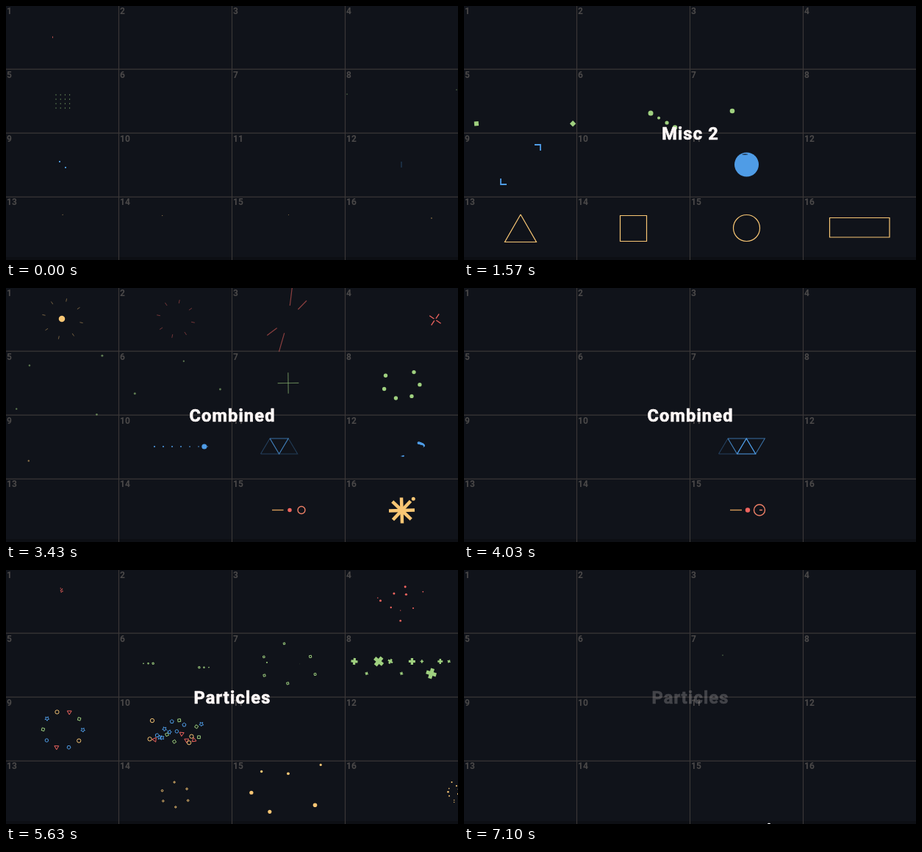
Animation of 615x346 px, one loop 7130 ms. Source, as an HTML page with a canvas:

```html
<!DOCTYPE html>
<html lang="en">
<head>
<meta charset="utf-8">
<title>Motion shapes</title>
<style>
html, body { margin: 0; width: 100%; height: 100%; overflow: hidden; background: #10131a; }
canvas, svg { position: absolute; left: 0; top: 0; width: 615px; height: 346px; }
text { font-family: Roboto, "Open Sans", sans-serif; font-weight: 700; }
.num { font-size: 12px; fill: #4b4949; }
#title { font-size: 23.5px; letter-spacing: 1.2px; fill: #fff8f7; stroke: #fff8f7; stroke-width: .7; stroke-linejoin: round; text-anchor: middle; }
</style>
</head>
<body>
<canvas id="stage" width="615" height="346"></canvas>
<svg viewBox="0 0 615 346"><g id="nums"></g><text id="title" x="308" y="182"></text></svg>
<script>
const LOOP = 7130, TAU = Math.PI * 2;
const BG = '#10131a', RED = '#f0645f', GREEN = '#9fd07f', BLUE = '#4f9ce6', GOLD = '#f8c674';
const g = document.getElementById('stage').getContext('2d');
const title = document.getElementById('title');
const nums = document.getElementById('nums');
for (let i = 0; i < 16; i++) {
  const n = document.createElementNS('http://www.w3.org/2000/svg', 'text');
  n.setAttribute('class', 'num');
  n.setAttribute('x', 1 + i % 4 * 154);
  n.setAttribute('y', 11 + Math.floor(i / 4) * 86.8);
  n.textContent = i + 1;
  nums.append(n);
}

// Timing
const part = (t, a, b) => Math.min(1, Math.max(0, (t - a) / (b - a)));
const ease = (t, a, b) => 1 - (1 - part(t, a, b)) ** 3;
const hump = (t, a, b) => Math.sin(Math.PI * part(t, a, b));
// Reaches 1 at time a, then drifts on by m until time b
const grow = (t, a, b, m) => t < a ? t / a : 1 + m * ease(t, a, b);
const rnd = n => { const v = Math.sin(n * 127.1 + 3.7) * 43758.5453; return v - Math.floor(v); };
const mix = (a, b, k) => a + (b - a) * k;

// Drawing
function fade(alpha, draw) {
  if (alpha <= 0) return;
  g.save();
  g.globalAlpha *= Math.min(1, alpha);
  draw();
  g.restore();
}
function clip(x, y, draw) {
  g.save();
  g.beginPath();
  g.rect(x, y, 153, 86);
  g.clip();
  draw();
  g.restore();
}
function dot(x, y, r, color) {
  if (r <= 0) return;
  g.fillStyle = color;
  g.beginPath();
  g.arc(x, y, r, 0, TAU);
  g.fill();
}
function ring(x, y, r, color, w = 1) {
  if (r <= 0 || w <= 0) return;
  g.strokeStyle = color;
  g.lineWidth = w;
  g.beginPath();
  g.arc(x, y, r, 0, TAU);
  g.stroke();
}
function line(color, w, ...p) {
  if (w <= 0) return;
  g.strokeStyle = color;
  g.lineWidth = w;
  g.beginPath();
  for (let i = 0; i < p.length; i += 2) g.lineTo(p[i], p[i + 1]);
  g.stroke();
}
function poly(x, y, r, n, color, rot = 0, star = false, filled = false) {
  if (r <= 0) return;
  const m = star ? n * 2 : n;
  g.beginPath();
  for (let i = 0; i < m; i++) {
    const a = rot - TAU / 4 + i * TAU / m, d = star && i % 2 ? r * .5 : r;
    g.lineTo(x + d * Math.cos(a), y + d * Math.sin(a));
  }
  g.closePath();
  g.lineWidth = 1;
  g.fillStyle = g.strokeStyle = color;
  filled ? g.fill() : g.stroke();
}
const square = (x, y, r, color) => poly(x, y, r * 1.25, 4, color, .6);
function ray(x, y, a, r, len, color, w) {
  const c = Math.cos(a), s = Math.sin(a);
  line(color, w, x + c * r, y + s * r, x + c * (r + len), y + s * (r + len));
}
function rays(x, y, n, r, len, color, w = 1, rot = 0) {
  for (let i = 0; i < n; i++) ray(x, y, rot + i * TAU / n, r, len, color, w);
}
function plus(x, y, size, color, rot) {
  for (const a of [rot, rot + TAU / 4]) {
    const c = Math.cos(a) * size / 2, s = Math.sin(a) * size / 2;
    line(color, size * .36, x - c, y - s, x + c, y + s);
  }
}
// Particles on a ring; jitter loosens angle, distance and size
function spray(n, cx, cy, rx, ry, size, color, draw = dot, phase = 0, jitter = .6) {
  const loose = k => (rnd(k + cx) - .5) * jitter;
  for (let i = 0; i < n; i++) {
    const a = phase + i * TAU / n + loose(i), d = 1 + loose(i + 30);
    draw(cx + rx * d * Math.cos(a), cy + ry * d * Math.sin(a), size * (1 + loose(i + 60)), color);
  }
}
function trace(path, length, a, b) {
  if (b <= a) return;
  g.strokeStyle = GOLD;
  g.lineWidth = 1.2;
  g.setLineDash([length * (b - a), length * 2]);
  g.lineDashOffset = -length * a;
  g.stroke(path);
  g.setLineDash([]);
}

const outlines = [
  ['M77 284L98.5 321.5H55.5Z', 130],
  ['M212.5 285.5H248.5V320.5H212.5Z', 142],
  ['M384.5 284.5a18 18 0 1 1 0 36a18 18 0 1 1 0-36', 114],
  ['M579 288.5V315H497.5V288.5Z', 216]
].map(([d, len]) => [new Path2D(d), len]);

function misc(t) {
  line(RED, 2 * (1 - part(t, 700, 1000)), 63 + 28 * ease(t, 250, 950), 42.5, 63.7 + 28 * ease(t, 0, 550), 42.5);
  ring(231, 43, 26 * ease(t, 60, 900), RED, 5 * (1 - ease(t, 100, 950)));
  rays(384, 43, 8, 24 * ease(t, 100, 900), 12 * hump(t, 30, 1000), RED, 1.5);
  fade(hump(t, 30, 1400), () => {
    poly(538, 43, 22 * ease(t, 30, 1000), 4, RED, t / 500);
    poly(538, 43, 12 * ease(t, 200, 1200), 4, RED, -t / 500);
  });

  const s = 1 + 2 * hump(t, 0, 800);
  fade(1 - part(t, 400, 850), () => {
    g.fillStyle = GREEN;
    for (let i = 0; i < 16; i++) g.fillRect(68 + i % 4 * 6.2 - s / 2, 121 + (i >> 2) * 6 - s / 2, s, s);
  });
  const slide = 74 * ease(t, 900, 2200), turn = (t - 1570) / 300;
  for (const side of [-1, 1])
    poly(82.5 + side * slide, 130 + slide * .46, 4.2 * hump(t, 900, 2200), 4, GREEN, turn + (side < 0 ? .7 : 0), false, true);
  const pop = hump(t, 1000, 2140), k = ease(t, 1000, 2140) / .875;
  for (let i = 0; i < 4; i++)
    dot(231 + (23 + 11 * i) * k, 134 + (12 + 6.5 * i) * k, (i ? 1.4 + .6 * i : 3.5) * pop, GREEN);
  dot(384 - 19 * k, 130 + 13 * k, 3.3 * pop, GREEN);
  ring(231, 130, 22 * ease(t, 40, 800), GREEN, 4 * (1 - ease(t, 100, 900)));
  poly(384, 130, 20 * hump(t, 40, 1000), 4, GREEN, t / 400);
  const meet = part(t, 0, 700) ** 2, fat = .6 + 2.6 * part(t, 0, 600);
  if (t < 700) {
    dot(mix(464, 538, meet), mix(120, 130, meet), fat, GREEN);
    dot(mix(613, 538, meet), mix(114, 130, meet), fat, GREEN);
  } else rays(538, 130, 8, 26 * ease(t, 700, 1300), 5 * (1 - part(t, 700, 1300)), GREEN, 2);

  const open = ease(t, 0, 900), shut = 1 - ease(t, 2250, 2700);
  fade(shut, () => {
    const d = mix(4, 27, open) * shut, arm = mix(1, 8, open);
    g.translate(77, 216);
    g.rotate(TAU / 4 * open);
    for (const side of [-1, 1])
      line(BLUE, 1.8, side * (d - arm), side * d, side * d, side * d, side * d, side * (d - arm));
  });
  rays(231, 216, 12, 24 * ease(t, 60, 1000), 9 * hump(t, 30, 1300), BLUE, 1.5, t / 700);
  const eaten = part(t, 1500, 2200);
  if (eaten < 1) {
    dot(384.5, 216, 16.5 * ease(t, 800, 1400), BLUE);
    g.fillStyle = BG;
    g.beginPath();
    g.ellipse(mix(382, 384.5, eaten), mix(200.5, 216, eaten), eaten && mix(2.5, 18, eaten), 18 * eaten ** 1.5, 0, 0, TAU);
    g.fill();
  }
  const wide = 30 * ease(t, 250, 1100), tall = mix(4, 20, ease(t, 0, 500)) * (1 - part(t, 900, 1400));
  fade(.2 + part(t, 0, 200), () => {
    for (const x of [538 - wide, 538 + wide]) line(BLUE, 1, x, 216 - tall, x, 216 + tall);
  });
  for (const [path, len] of outlines) trace(path, len, ease(t, 2250, 2750), ease(t, 0, 700));
}

function combined(t) {
  const fly = grow(t, 80, 700, 1.4), gone = 1 - part(t, 400, 800), swell = 1 + 2 * hump(t, 80, 800);
  dot(76, 42, t < 80 ? 3.5 * t / 80 : mix(3.5, 11, hump(t, 80, 700)) * gone, GOLD);
  fade(gone, () => {
    rays(77, 42, 8, 10 * fly, 2 + 4 * hump(t, 80, 700), GOLD, .8, .2);
    rays(231, 42, 8, 9 * fly, 2 + 5 * hump(t, 80, 700), RED, .8, .2);
    for (let i = 0; i < 4; i++)
      ray(384, 43, -1.45 + i % 2 * .65 + (i >> 1) * 3.3, 8 * fly, (11 - i % 2 * 4) * fly, RED, 1.2);
    rays(384, 129.5, 4, 0, 6 * fly, GREEN, 1.2, ease(t, 80, 700) * 1.57);
    spray(4, 77, 130, 26 * fly, 21 * fly, .55 * swell, GREEN, dot, .8);
    spray(3, 231, 130, 38 * fly, 15 * fly, .5 * swell, GREEN, dot, .4);
    spray(2, 77, 303, 28 * fly, 28 * fly, .55 * swell, GOLD, dot, .8);
  });
  const run = ease(t, 80, 900), orbit = Math.max(0, t - 80) / 130;
  fade(1 - part(t, 700, 1000), () => {
    rays(mix(487, 590, run), 43, 4, 1.8, 7.5, RED, 1.3, .785 + run * Math.PI);
    for (let i = 0; i < 6; i++) {
      const a = t / 180 + .45 - i * .9;
      if (i * 90 < t) dot(538 + 25 * Math.cos(a), 130 + 21 * Math.sin(a), .7 + 2 * hump(t, 80, 1000), GREEN);
    }
    dot(mix(187, 275, run), 216, 3.5, BLUE);
    for (let i = 0; i * 80 <= t && i < 7; i++) dot(202 + i * 12, 216, 1.1 - i * .06, BLUE);
    for (let i = 0; i < 24; i++) {
      const a = Math.PI - orbit + i * .046;
      dot(538 + 31 * Math.cos(a), 215 + 6 * Math.sin(a), 1.9 * (1 - i / 25), BLUE);
      dot(538 + 16 * Math.cos(a + 2.1), 216 + 13 * Math.sin(a + 2.1), 1 - i / 7, BLUE);
    }
  });
  const star = t < 80 ? t / 80 : 1 + .8 * hump(t, 80, 900);
  fade(1 - part(t, 650, 950), () => {
    rays(538.5, 303, 8, 0, 10 * star, GOLD, 4.5, orbit * .4);
    dot(538.5 + 9 * star, 303 - 9 * star, 2.5, GOLD);
  });

  const leave = 1 - part(t, 1200, 1400);
  for (let i = 0; i < 4; i++) {
    const x = 359 + 12.6 * i, base = i % 2 ? 205 : 226;
    fade((1 - .33 * Math.abs(i - 2)) * part(t, 200 + i * 160, 400 + i * 160) * leave, () =>
      line(BLUE, 1.1, x - 12.5, base, x + 12.5, base, x, 431 - base, x - 12.5, base));
  }
  fade(leave, () => {
    line('#d69a58', 1.4, 362, 302.5, 363 + 15 * ease(t, 80, 800), 302.5);
    dot(386, 302.5, 3.2 * ease(t, 300, 900), RED);
    ring(402, 302.5, 7.5 * ease(t, 400, 1000), '#ee8067', 1.4);
    line('#ee8067', 1.4 * part(t, 600, 900), 402, 302.5, 406, 302.5);
  });
}

const kinds = {
  s: (x, y, r, a) => poly(x, y, r * 1.15, 5, BLUE, a, true),
  o: (x, y, r) => ring(x, y, r, GOLD),
  t: (x, y, r, a) => poly(x, y, r * 1.3, 3, RED, a + .5),
  q: (x, y, r, a) => poly(x, y, r, 4, GREEN, a + .5),
  p: (x, y, r, a) => poly(x, y, r, 5, BLUE, a),
  b: (x, y, r) => ring(x, y, r * .85, BLUE)
};
const order = 'sotqsoptbq';

function particles(t) {
  const early = part(t, 0, 350), rise = part(t, 480, 1400), late = 1 - part(t, 1900, 2400);
  const brief = early * (1 - part(t, 700, 1200)), drift = mix(.2 * early, 1, rise);

  const tight = early * (1 - .6 * rise), small = early * (1 - .8 * rise) * (1 - part(t, 1380, 1600));
  for (let i = 0; i < 6; i++)
    ring(mix(78.5, 75.5, rise) + 3.5 * Math.sin(i * 2.2 - 1.3) * tight, mix(48, 27, rise) + (2.4 * i - 6) * tight, (1.3 + i * .15) * small, RED);
  spray(10, 231.5, 43, 8 * grow(t, 480, 1100, .8), 8 * grow(t, 480, 1100, .8), 1.7 * brief, RED, ring, t / 500, .5);
  for (let i = 0; i < 4; i++)
    dot(386 - i % 3 * 1.5, mix(49, 43 + i * 3.5, grow(t, 480, 1400, .6)), (1.3 + i * .4) * brief, RED);
  dot(384 - 15 * grow(t, 480, 1400, .6), 45, brief, RED);
  spray(10, 537, 43, 28 * mix(.8 * early, 1, rise), 22 * mix(.5 * early, 1, rise), mix(.6 * early, 1.2, rise) * late, RED, dot, .6, 1);

  spray(9, 79, 119, 6.5 * grow(t, 480, 1200, .8), 6.5 * grow(t, 480, 1200, .8), 1.3 * brief, GREEN, square, 0, .9);
  const sway = 2.7 * Math.cos((t - 480) / 900 * Math.PI);
  for (let i = 0; i < 3; i++) {
    const gap = i * mix(9.5, 6.5, rise), r = (.4 + i * .4) * early * late;
    square(187 + gap, 130 + sway, r, GREEN);
    square(276 - gap, 130 - sway, r, GREEN);
  }
  spray(6, 384, 130, 37 * drift, 27 * drift, 1.5 * rise * (1 - part(t, 2000, 2600)), GREEN, square, -1.7, .4);
  dot(355, 126, early * late, GREEN);
  square(mix(387, 400, rise), 128, 1.4 * early * (1 - rise), GREEN);
  dot(352, 116, .6 * part(t, 2500, 2700), GREEN);
  for (let i = 0; i < 10; i++) {
    const wait = 130 + 290 * Math.max(0, Math.sin(i * Math.PI / 6));
    const size = [9, 4.5, 14, 7, 4.5][i % 5] * part(t, wait, wait + 350) * (1 - part(t, 2000 + i * 40, 2500 + i * 40));
    const x = 474 + 14.3 * i + 7 * Math.sin(i * Math.PI / 9), y = 130 + 11 * Math.cos((i - 1) * TAU / 3);
    plus(x, y + 13 * (1380 - t) / 900, size, GREEN, rnd(i) * t / 1600);
  }

  const far = ease(t, 0, 350) * (18.8 + t * .006), size = 2.6 * early * (1 - part(t, 1800, 2300));
  for (let i = 0; i < 10; i++) {
    const a = -2.5 + i * TAU / 10;
    kinds[order[i]](77.5 + far * Math.cos(a), 217.5 + far * .93 * Math.sin(a), size, t / 2500);
  }
  fade(.3 + rise, () => {
    for (let i = 0; i < 22; i++) {
      const x = 231 + (i * 3.4 - 36) * drift, y = 220 + (rnd(i + 90) - .5) * 32 * drift;
      kinds[order[Math.floor(rnd(i) * 10)]](x, y, 2.7 * mix(.12 * early, 1, rise) * (1 - part(t, 2100, 2700)), t / 600 + i);
    }
  });
  poly(381.5, 214 - 8 * rise, 3.2 * brief, 5, BLUE, rise * 2);
  ring(363 - 8 * rise, 221, brief, GOLD, .8);
  ring(540.5, 219.5, 9.5 * early + 5 * rise, GOLD, 1.8 * (1 - part(t, 700, 1150)));
  poly(542.5, 205 - 8 * rise, 2.5 * brief, 3, GOLD, -.6, false, true);

  const boom = grow(t, 480, 1200, .15), die = early * (1 - part(t, 650, 1250));
  spray(6, 78, 300, 61 * boom, 38 * boom, 1.4 * die, GOLD, dot, 0, .1);
  spray(5, 76, 301, 36 * boom, 25 * boom, 2.3 * die, GOLD, dot, .42, .3);
  dot(85, 291, 3 * die, GOLD);
  dot(93, 291, 3 * die, GOLD);
  fade(.5, () => {
    for (let i = 0; i < 4; i++) dot(72 + 2 * i, 297 + 4.3 * i, 3.7 * die, GOLD);
  });
  dot(228, 282 - 6 * rise, brief * .7, GOLD);
  spray(6, 231, 307, 21 * drift, 17 * drift, 1.2 * rise * (1 - part(t, 2100, 2700)), GOLD, ring, -.6, .2);

  clip(308, 261, () => {
    const reach = mix(.1, 1, rise) + .6 * part(t, 1400, 2600), drop = part(t, 2000, 2850);
    spray(3, 384, 301, 18 * boom, 18 * boom, 1.3 * brief, GOLD, dot, -1.57);
    spray(7, 384, 303, 48 * reach, 43 * reach, 2.2 * rise * (1 - part(t, 2200, 2750)), GOLD, dot, -.75, .9);
    dot(mix(384, 415, drop), mix(303, 347, drop), 2.3 * part(t, 2000, 2250), '#fff');
  });
  clip(462, 261, () => {
    g.translate((t - 480) * .152, 0);
    spray(10, 473, 303, 8 * early, 11 * early, early, GOLD, dot, 0, .7);
  });
}

const scenes = [[0, 2850, 'Misc 2', misc], [2850, 4250, 'Combined', combined], [4250, LOOP, 'Particles', particles]];

function frame(now) {
  const t = now % LOOP;
  g.fillStyle = BG;
  g.fillRect(0, 0, 615, 346);
  g.fillStyle = '#0d0f14';
  g.fillRect(0, 342, 615, 4);
  for (let i = 1; i < 4; i++) {
    line('#3a3737', 1.2, i * 154 - .5, 0, i * 154 - .5, 346);
    line('#3a3737', 1.2, 0, i * 87 - .8, 615, i * 87 - .8);
  }
  const [start, stop, name, draw] = scenes.find(s => t < s[1]);
  draw(t - start);
  if (title.textContent !== name) title.textContent = name;
  title.style.opacity = Math.min(part(t - start, 30, 200), part(stop - t, 0, 140));
  requestAnimationFrame(() => frame(performance.now()));
}
frame(0);
</script>
</body>
</html>
```
